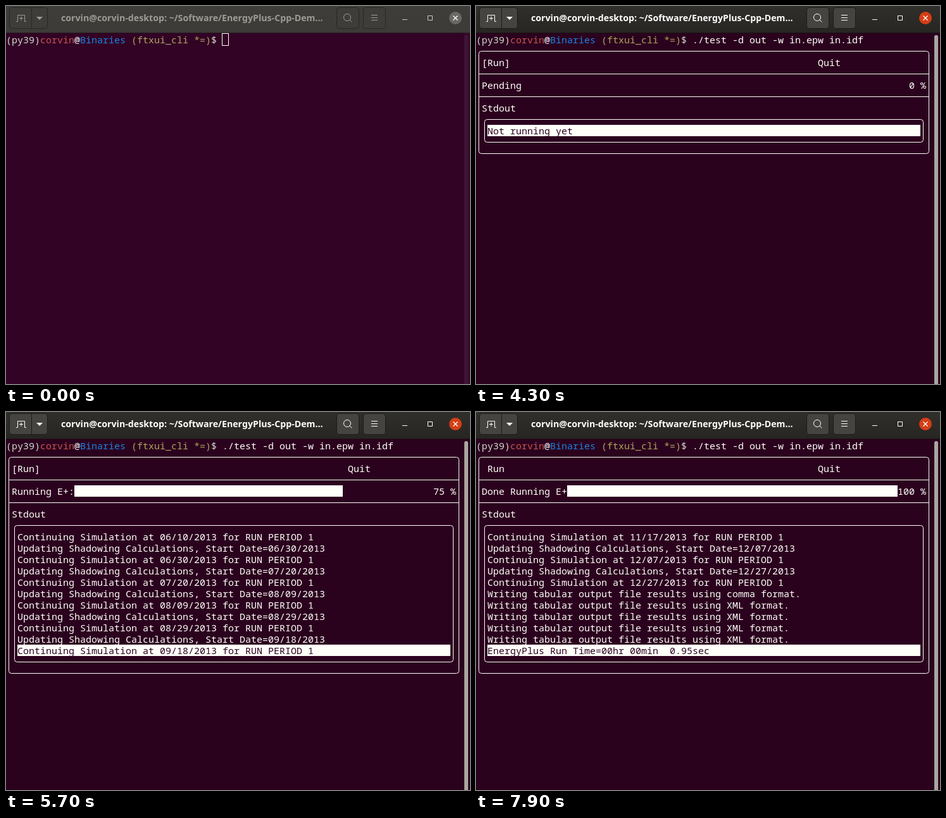
Recreate the animation shown at these times as an HTML page with a canvas. Size 733 by 598 pixels, loop 8000 ms.

```html
<!DOCTYPE html>
<html lang="en">
<head>
<meta charset="utf-8">
<title>Terminal simulation run</title>
<style>
  html, body { margin: 0; width: 100%; height: 100%; overflow: hidden; background: #2b021e; }
  canvas { display: block; }
</style>
</head>
<body>
<canvas id="stage" width="733" height="598"></canvas>
<script>
const ctx = document.getElementById('stage').getContext('2d');
const LOOP = 8000, CELL = 9, LINE = 18, TOP = 44, MAX_LINES = 11;
const MONO = '15px "Noto Sans Mono", "DejaVu Sans Mono", monospace';
const WHITE = '#fffffa';
const COMMAND = './test -d out -w in.epw in.idf';
const PROMPT = [
  ['(py39)', '#d3d7cf'], ['corvin', '#cb5350'], ['@', '#ffffff'], ['Binaries', '#1d83e2'],
  [' (ftxui_cli *=)', '#b0a35c'], ['$ ', '#d3d7cf']
];

// Simulation log: start-up messages, one report every 20 days, then the closing lines.
const VERSION = 'EnergyPlus, Version 22.2.0-42feb8cd52, YMD=2022.10.12 14:08';
const log = [
  'Not running yet', VERSION, VERSION,
  'Initializing Response Factors',
  'Initializing Window Optical Properties',
  'Initializing Solar Calculations',
  'Allocate Solar Module Arrays',
  'Initializing Zone and Enclosure Report Variables',
  'Initializing Surface (Shading) Report Variables',
  'Computing Interior Solar Absorption Factors',
  'Determining Shadowing Combinations',
  'Computing Window Shade Absorption Factors',
  'Proceeding with Initializing Solar Calculations',
  'Initializing Surfaces',
  'Initializing Outdoor environment for Surfaces',
  'Initializing HVAC',
  'Warming up', 'Warming up', 'Warming up', 'Warming up'
];
const reportEnd = [];
for (let i = 0; i < 19; i++) {
  const [y, m, d] = new Date(Date.UTC(2013, 0, 1 + 20 * i)).toISOString().slice(0, 10).split('-');
  const date = `${m}/${d}/${y}`;
  if (i) log.push('Updating Shadowing Calculations, Start Date=' + date);
  log.push(`${i ? 'Continuing' : 'Starting'} Simulation at ${date} for RUN PERIOD 1`);
  reportEnd.push(log.length);
}
log.push('Writing tabular output file results using comma format.');
for (let i = 0; i < 4; i++) log.push('Writing tabular output file results using XML format.');
log.push('EnergyPlus Run Time=00hr 00min  0.95sec');

function mix(from, to, k) {
  return `rgb(${from.map((v, i) => Math.round(v + (to[i] - v) * k))})`;
}

function rect(x, y, w, h, color) {
  ctx.fillStyle = color;
  ctx.fillRect(x, y, w, h);
}

function roundRect(x, y, w, h, r, stroke, fill) {
  ctx.beginPath();
  ctx.roundRect(x, y, w, h, r);
  if (fill) { ctx.fillStyle = fill; ctx.fill(); }
  if (stroke) { ctx.strokeStyle = stroke; ctx.stroke(); }
}

function path(points, color) {
  ctx.strokeStyle = color;
  ctx.beginPath();
  points.forEach(([x, y, move], i) => i && !move ? ctx.lineTo(x, y) : ctx.moveTo(x, y));
  ctx.stroke();
}

function text(col, row, string, color = WHITE) {
  ctx.font = MONO;
  ctx.fillStyle = color;
  ctx.fillText(string, col * CELL, TOP + row * LINE + 15);
}

function drawTitleBar(focus) {
  const gradient = ctx.createLinearGradient(0, 0, 0, 42);
  gradient.addColorStop(0, mix([62, 61, 57], [48, 47, 43], focus));
  gradient.addColorStop(1, mix([60, 59, 55], [39, 38, 34], focus));
  rect(0, 0, 733, 42, gradient);
  rect(0, 42, 733, 1, mix([40, 30, 34], [28, 20, 22], focus));

  const ink = mix([158, 155, 149], [255, 255, 255], focus);
  const edge = mix([40, 39, 36], [28, 27, 24], focus);
  const face = mix([62, 61, 57], [69, 68, 64], focus);
  for (const [x, w] of [[5.5, 60], [522.5, 35], [564.5, 35]]) roundRect(x, 2.5, w, 33, 4, edge, face);
  path([[40.5, 3], [40.5, 35]], edge);

  // New tab, drop-down arrow, search and menu icons
  path([[16, 24.5], [18.5, 24.5], [18.5, 14.5], [29.5, 14.5], [29.5, 24.5], [32, 24.5]], ink);
  path([[21, 19.5], [27, 19.5], [24, 16.5, 1], [24, 22.5]], ink);
  ctx.fillStyle = ink;
  ctx.beginPath();
  ctx.moveTo(48, 17); ctx.lineTo(58, 17); ctx.lineTo(53, 22);
  ctx.fill();
  ctx.strokeStyle = ink;
  ctx.beginPath();
  ctx.arc(539, 18, 5.5, 0, 7);
  ctx.stroke();
  path([[543, 22], [546.5, 25.5]], ink);
  for (const y of [14, 18, 22]) rect(577, y, 10, 1, ink);

  ctx.font = 'bold 14.2px "Noto Sans", "Open Sans", sans-serif';
  ctx.fillStyle = ink;
  ctx.fillText('corvin@corvin-desktop: ~/Software/EnergyPlus-Cpp-Dem…', 87, 24);

  // Window controls
  const control = mix([205, 203, 198], [255, 255, 255], focus);
  rect(626, 21, 8, 1, control);
  path([[666.5, 15.5], [673.5, 15.5], [673.5, 22.5], [666.5, 22.5], [666.5, 15]], control);
  ctx.fillStyle = mix([106, 104, 99], [212, 62, 22], focus);
  ctx.beginPath();
  ctx.arc(710, 19, 10, 0, 7);
  ctx.fill();
  ctx.lineWidth = 1.4;
  path([[706.5, 15.5], [713.5, 22.5], [713.5, 15.5, 1], [706.5, 22.5]], '#ffffff');
  ctx.lineWidth = 1;
}

function drawPrompt(t) {
  let col = 0;
  for (const [string, color] of PROMPT) {
    text(col, 0, string, color);
    col += string.length;
  }
  if (t < 500) {
    ctx.strokeStyle = WHITE;
    ctx.strokeRect(col * CELL - 0.5, TOP - 0.5, CELL + 1, LINE + 1);
  } else if (t < 1300) {
    rect(col * CELL, TOP, CELL, LINE, WHITE);
  } else {
    text(col, 0, COMMAND);
    const cursorOn = t < 1900 || (t >= 2500 && t < 2900);
    if (cursorOn) rect((col + COMMAND.length) * CELL, TOP, CELL, LINE, WHITE);
  }
}

function runState(t) {
  if (t < 5000) return { label: 'Pending', progress: 0, count: 1 };
  if (t >= 6200) return { label: 'Done Running E+', progress: 1, count: log.length };
  const step = Math.min(9, Math.floor((t - 5000) / 100));
  const label = 'Running E+:';
  if (step < 3) return { label, progress: 0, count: [3, 12, 19][step] };
  const report = Math.min(18, Math.floor((step - 3) * 3.4));
  return { label, progress: Math.min(1, (20 * report + 13.1) / 365), count: reportEnd[report] };
}

function drawApp(t) {
  const { label, progress, count } = runState(t);
  const lines = log.slice(0, count).slice(-MAX_LINES);
  const innerHeight = (lines.length + 1) * LINE;

  roundRect(4.5, 71.5, 711, innerHeight + 126, 4, WHITE);
  rect(5, 107, 710, 1, WHITE);
  rect(5, 143, 710, 1, WHITE);
  roundRect(13.5, 179.5, 693, innerHeight, 4, WHITE);

  const overQuit = t >= 3700 && t < 4300;
  const overRun = !overQuit && t < 7900;
  text(1, 2, overRun ? '[Run]' : ' Run ');
  text(59, 2, overQuit ? '[Quit]' : ' Quit ');

  // Gauge fills the cells between label and percentage in eighths of a cell
  const percent = Math.round(progress * 100) + ' %';
  const start = 1 + label.length, end = 79 - percent.length;
  text(1, 4, label);
  text(end, 4, percent);
  const cells = Math.floor((end - start) * progress * 8) / 8;
  rect(start * CELL, TOP + 4 * LINE, Math.floor(cells * CELL), LINE, WHITE);

  text(1, 6, 'Stdout');
  lines.forEach((line, i) => {
    const selected = i === lines.length - 1;
    if (selected) rect(18, TOP + (8 + i) * LINE, 684, LINE, WHITE);
    text(2, 8 + i, line, selected ? '#2b021e' : WHITE);
  });
}

function draw(t) {
  const focus = Math.max(0, Math.min(1, Math.floor((t - 400) / 100) / 5));
  ctx.lineWidth = 1;
  rect(0, 0, 733, 598, mix([50, 3, 37], [43, 2, 30], focus));
  rect(724, 43, 9, 555, mix([54, 9, 42], [43, 2, 30], focus));
  roundRect(724, 46, 6, 560, 3, null, mix([62, 21, 53], [170, 166, 160], focus));
  drawTitleBar(focus);
  drawPrompt(t);
  if (t >= 2900) drawApp(t);
}

const startTime = performance.now();
function tick() {
  draw((performance.now() - startTime) % LOOP);
  requestAnimationFrame(tick);
}
tick();
</script>
</body>
</html>
```
